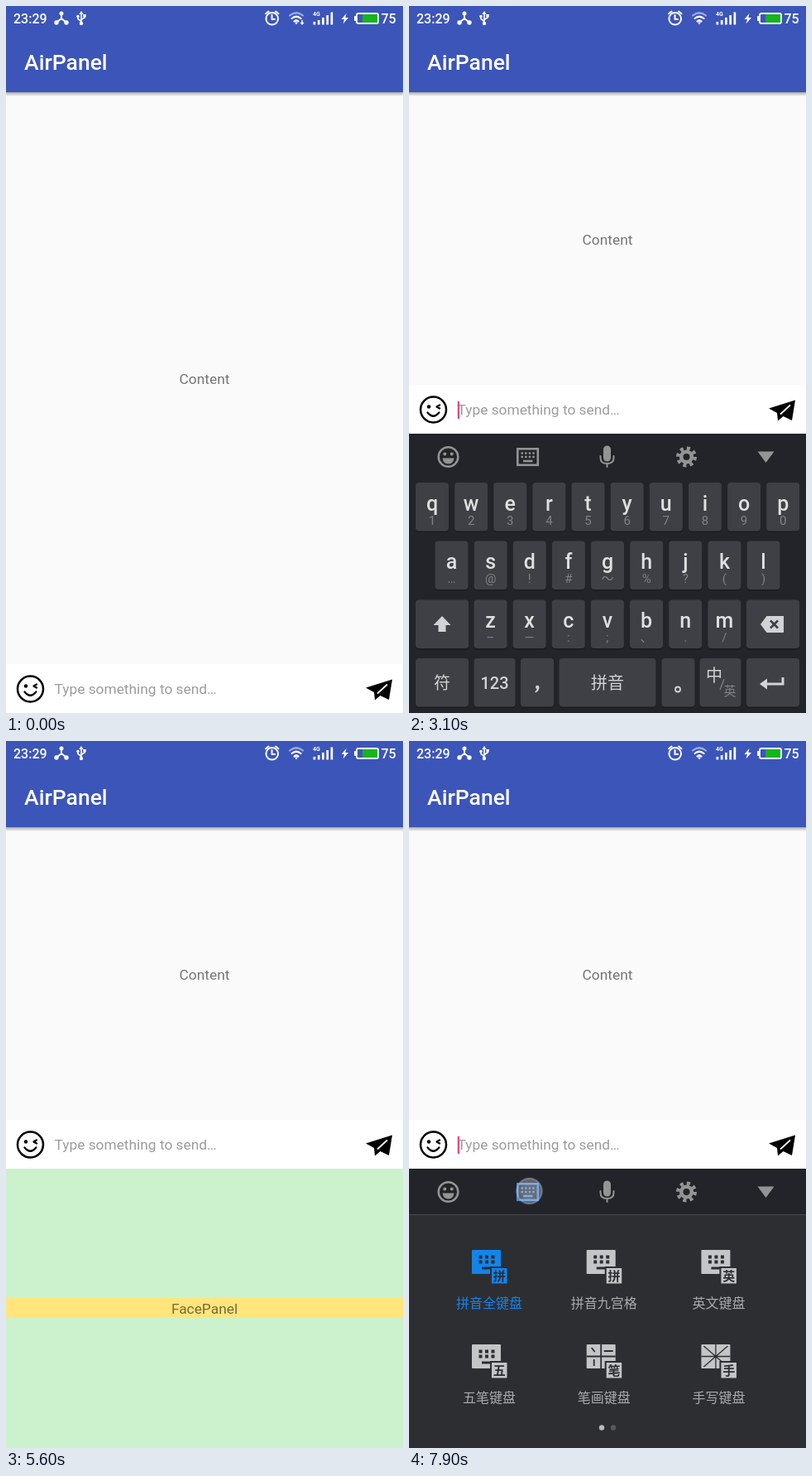
These frames come from a looping animation (480 px wide and 853 px high, 8 s). An HTML page:

```html
<!DOCTYPE html>
<html lang="en">
<head>
<meta charset="utf-8">
<title>AirPanel</title>
<style>
html, body { margin: 0; width: 100%; height: 100%; overflow: hidden; background: #fafafa }
svg { display: block; width: 480px; height: 853px }
text { font: 17.33px Roboto, "Noto Sans CJK SC", sans-serif }
.mid { text-anchor: middle }
.status { font-size: 16px; font-weight: 500 }
.letter { font-size: 25px; font-weight: 500; fill: #dedfe0 }
.sub { font-size: 15px; fill: #808286 }
.wide { font-size: 20px; font-weight: 500; fill: #d2d3d4 }
.label { font-size: 16px }
.badge { font-size: 15px; font-weight: 700; fill: #2d2e32 }
.line { fill: none; stroke-linecap: round; stroke-linejoin: round }
</style>
</head>
<body>
<svg viewBox="0 0 480 853">
  <defs>
    <linearGradient id="shade" x2="0" y2="1">
      <stop stop-color="#000" stop-opacity=".32"/>
      <stop offset="1" stop-color="#000" stop-opacity="0"/>
    </linearGradient>
    <radialGradient id="glow">
      <stop offset=".5" stop-color="#cfd3e6" stop-opacity=".4"/>
      <stop offset="1" stop-color="#cfd3e6" stop-opacity=".1"/>
    </radialGradient>
  </defs>
  <rect width="480" height="853" fill="#fafafa"/>
  <text id="content" class="mid" x="240" fill="#757575">Content</text>

  <rect y="104" width="480" height="5" fill="url(#shade)"/>
  <rect width="480" height="104" fill="#3c55b9"/>
  <text x="22" y="77" fill="#fff" style="font-size:26.5px;font-weight:500">AirPanel</text>

  <g fill="#fff">
    <text class="status" x="9" y="20.7">23:29</text>
    <text class="status" x="453.5" y="20.7">75</text>
    <path class="line" stroke="#fff" stroke-width="2" d="M67 9v6l-5.500 4.500M67 15l5.500 4.500"/>
    <circle cx="67" cy="9" r="2.500"/><circle cx="61" cy="20" r="2.700"/><circle cx="73" cy="20" r="2.700"/>
    <path class="line" stroke="#fff" stroke-width="1.600" d="M91 9v12M91 18.500l-4-3v-3M91 16.500l4-2.500v-2"/>
    <path d="M88.300 10l2.700-4 2.700 4zM93.300 10h3.400v3.400h-3.400z"/>
    <circle cx="91" cy="21" r="2.200"/><circle cx="87" cy="12.500" r="1.800"/>
    <g class="line" stroke="#fff" stroke-width="2">
      <circle cx="321.700" cy="15.300" r="7.300"/>
      <path d="M321.500 11v5h3.500M314 9.300l3.500-2.800M329.500 9.300L326 6.500"/>
    </g>
    <g class="line" stroke="#fff" stroke-width="2.200">
      <path opacity=".5" d="M343 11.500q8-6.500 16 0"/>
      <path d="M345.500 15q5.500-4.500 11 0"/>
      <path d="M348.500 18.500q2.500-2 5 0"/>
    </g>
    <path d="M349 19.500h4l-2 3z"/>
    <path id="arrow" stroke="#3c55b9" d="M356.800 16.500h2.400v3h2.500l-3.700 4-3.700-4h2.500z"/>
    <text x="371" y="12" style="font-size:7px;font-weight:700">4G</text>
    <path d="M371.500 19h2.700v3.500h-2.700zM376.800 17h2.700v5.500h-2.700zM382 14h2.700v8.500H382zM387.300 11h2.700v11.500h-2.700zM392.500 7.500h2.700v15h-2.700z"/>
    <path d="M411.500 9l-6 7h3.500l-1.500 5.500 6.500-7.500h-3.700z"/>
    <rect x="421" y="12" width="3" height="6" rx="1"/>
    <rect x="424" y="9" width="26" height="12" rx="2" fill="none" stroke="#fff" stroke-width="1.800"/>
    <rect x="431" y="10" width="18" height="10" fill="#15b51b"/>
  </g>

  <g id="face">
    <rect y="516" width="480" height="337" fill="#ccf1cd"/>
    <rect y="672" width="480" height="24" fill="#ffe57b"/>
    <text class="mid" x="240" y="691" fill="#000" fill-opacity=".54">FacePanel</text>
  </g>

  <g id="bar">
    <rect width="480" height="59" fill="#fff"/>
    <g class="line" stroke="#000" stroke-width="2.500">
      <circle cx="29.500" cy="30" r="15.500"/>
      <path stroke-width="2.300" d="M22.500 33.500q6.800 8.500 13.800 0M37 24.500l-3.500 2 3.500 2"/>
    </g>
    <circle cx="24" cy="26.500" r="2.200"/>
    <text x="58.500" y="36" fill="#9c9c9c">Type something to send…</text>
    <path d="M435 28.500L467 18.500 463 43 452.500 38 446 43.500 445 34z"/>
    <path d="M449 35.500L461 24.500" stroke="#fff" stroke-width="1.700"/>
    <rect id="cursor" x="58.700" y="20" width="2.300" height="21" fill="#e84a7b"/>
  </g>

  <g id="keyboard">
    <rect width="480" height="337" fill="#222429"/>
    <g id="keys"></g>
    <g id="modes">
      <rect y="56" width="480" height="281" fill="#2d2e32"/>
      <rect y="55" width="480" height="1" fill="#4a4b4f"/>
      <circle cx="233" cy="312.500" r="3.200" fill="#b9babb"/>
      <circle cx="247" cy="312.500" r="3.200" fill="#58595c"/>
    </g>
    <g fill="#939496" stroke="#939496">
      <g class="line" stroke-width="2.500">
        <circle cx="47.500" cy="28" r="11.800"/>
        <circle cx="335.500" cy="28" r="6.300" stroke-width="4.600"/>
        <circle cx="335.500" cy="28" r="10.300" stroke-width="4.400" stroke-linecap="butt" stroke-dasharray="4.045"/>
        <path stroke-width="2" d="M231.500 27v2q0 7 8 7t8-7v-2M239.500 36v4"/>
      </g>
      <path stroke="none" d="M40.500 29.500h14q-1 7-7 7t-7-7z"/>
      <circle stroke="none" cx="43.300" cy="24.500" r="2"/><circle stroke="none" cx="51.700" cy="24.500" r="2"/>
      <rect stroke="none" x="235" y="14.500" width="9" height="19" rx="4.500"/>
      <path stroke="none" d="M421.500 21.500h20l-10 13.500z"/>
    </g>
    <g id="switch" fill="none" stroke="#939496" stroke-width="2.600">
      <rect x="131.300" y="18.300" width="24.500" height="19.500"/>
      <path d="M135.500 23.500h16.500M135.500 28h16.500" stroke-dasharray="2.500 2.100"/>
      <path d="M138 33h11.500"/>
    </g>
  </g>

  <g id="touch">
    <circle r="15" fill="#fff" fill-opacity=".38" stroke="#c3cbe6" stroke-opacity=".75" stroke-width="2"/>
    <circle id="halo" r="17" fill="url(#glow)"/>
  </g>
</svg>
<script>
const $ = id => document.getElementById(id);
const text = (cls, x, y, s, fill = '') =>
  `<text class="${cls} mid" x="${x}" y="${y}" ${fill && `fill="${fill}"`}>${s}</text>`;
const key = (x, y, w) =>
  `<rect x="${x}" y="${y + 1.5}" width="${w}" height="58.500" rx="4" fill="#1a1b1f"/>` +
  `<rect x="${x}" y="${y}" width="${w}" height="58.500" rx="4" fill="#3e4045"/>`;

function buildKeys() {
  const rows = [
    [8, 59, 'qwertyuiop', '1234567890'],
    [31.5, 129.5, 'asdfghjkl', '…@!#～%?()'],
    [78.5, 200.5, 'zxcvbnm', '–—:;、./'],
  ];
  let out = '';
  for (const [x0, y, letters, subs] of rows)
    [...letters].forEach((c, i) => {
      const x = x0 + i * 47.13;
      out += key(x, y, 40) + text('letter', x + 20, y + 33.5, c) + text('sub', x + 20, y + 50.5, subs[i]);
    });
  const wide = [[8, 64, '符'], [78.5, 50, '123'], [135, 40, ''], [181.5, 117, '拼音'], [305.5, 40, ''], [351.5, 50, ''], [408, 64, '']];
  for (const [x, w, s] of wide)
    out += key(x, 271, w) + text('wide', x + w / 2, 307.5, s);
  out += key(8, 200.5, 64) + key(408, 200.5, 64);
  // shift, backspace, punctuation, language and enter marks
  return out + `<g fill="#d2d3d4">
    <path d="M40 220l10.500 11h-6v8h-9v-8h-6z"/>
    <path d="M425 230l7.500-10H453v20h-20.500z"/>
    <path d="M437 225.500l9 9m0-9l-9 9" stroke="#3e4045" stroke-width="2.600"/>
    <path d="M153.500 304q4-1 4 2 0 4-4.500 6.500l-.7-1.200q2.500-1.800 2.300-3.500-2 0-1.100-3.800z"/>
    <circle cx="325" cy="308.500" r="3" fill="none" stroke="#d2d3d4" stroke-width="1.800"/>
    <path d="M452 294v8h-20" fill="none" stroke="#d2d3d4" stroke-width="3"/>
    <path d="M424 302l9-6.500v13z"/></g>
    <path d="M381 296l-5 13" stroke="#808286" stroke-width="1.200"/>` +
    text('wide', 369, 299, '中') + text('sub', 388, 316, '英');
}

function buildModes() {
  const names = ['拼音全键盘', '拼音九宫格', '英文键盘', '五笔键盘', '笔画键盘', '手写键盘'];
  const dark = '#2d2e32';
  const faces = [
    '<path d="M-12.500 8.500H7M-12.500 14.500H7" stroke-width="4" stroke-dasharray="4 3.500"/><path d="M-9 22H4" stroke-width="3"/>',
    '<path d="M-21 14.500H14M-3.500 0V29M-15 4l4 5M0 8H11M-12 18v8" stroke-width="1.800"/>',
    '<path d="M-21 14.500H14M-3.500 0V29M-18 2L11 27M11 2L-18 27" stroke-width="1.300"/>',
  ];
  return names.map((name, i) => {
    const col = i % 3, row = i > 2, color = i ? '#c4c5c6' : '#1185ec';
    return `<g transform="translate(${97 + col * 138.7} ${row ? 212 : 98})">
      <rect x="-21" width="35" height="29" rx="1" fill="${color}"/>
      <g fill="none" stroke="${dark}">${faces[row ? col : 0]}</g>
      <rect x="2" y="21" width="20.500" height="20.500" fill="${color}" stroke="${dark}" stroke-width="2"/>
      ${text('badge', 12.3, 36.7, '拼拼英五笔手'[i])}
      ${text('label', 0, 69.5, name, i ? '#a9aaac' : color)}</g>`;
  }).join('');
}

$('keys').innerHTML = buildKeys();
$('modes').innerHTML += buildModes();

const H = 337;
const within = (t, ...spans) => spans.some(([a, b]) => t >= a && t < b);
const show = (id, on) => $(id).setAttribute('visibility', on ? 'visible' : 'hidden');
const move = (id, x, y) => $(id).setAttribute('transform', `translate(${x} ${y})`);
const clamp = v => Math.min(1, Math.max(0, v));

// start, end, x, y, opacity
const touches = [
  [700, 1000, 38, 827, 1], [1000, 2400, 38, 827, .7], [2400, 2800, 118, 494, .8],
  [4100, 4400, 35, 478, 1], [4400, 4500, 35, 478, .5], [6000, 6400, 118, 494, .8], [7700, 8000, 145.5, 543, .6],
];

// Share of the keyboard that is on screen: decelerates in, accelerates out
function keyboardShare(t) {
  const rise = start => 1 - (1 - clamp((t - start) / 290)) ** 2;
  if (t < 4300) return rise(2700);
  if (t < 6300) return 1 - clamp((t - 4300) / 280) ** 2;
  return rise(6300);
}

function draw(now) {
  const t = Math.floor(now % 8000 / 100) * 100;
  const open = t >= 1000;
  move('bar', 0, open ? 457 : 794);
  $('content').setAttribute('y', open ? 287.5 : 456);
  show('face', within(t, [1000, 2700], [4400, 6300]));
  show('cursor', within(t, [2700, 3300], [6300, 6900], [7700, 8000]));
  show('arrow', within(t, [0, 700], [2200, 2400], [3700, 4100]));

  move('keyboard', 0, 853 - H * keyboardShare(t));
  const modes = t >= 7900;
  show('keys', !modes);
  show('modes', modes);
  $('switch').setAttribute('stroke', t >= 7800 ? '#3f8ce0' : '#939496');

  const touch = touches.find(([a, b]) => t >= a && t < b);
  show('touch', touch);
  show('halo', t >= 7800);
  if (touch) {
    move('touch', touch[2], touch[3]);
    $('touch').setAttribute('opacity', touch[4]);
  }
  requestAnimationFrame(draw);
}
draw(performance.now());
</script>
</body>
</html>
```
